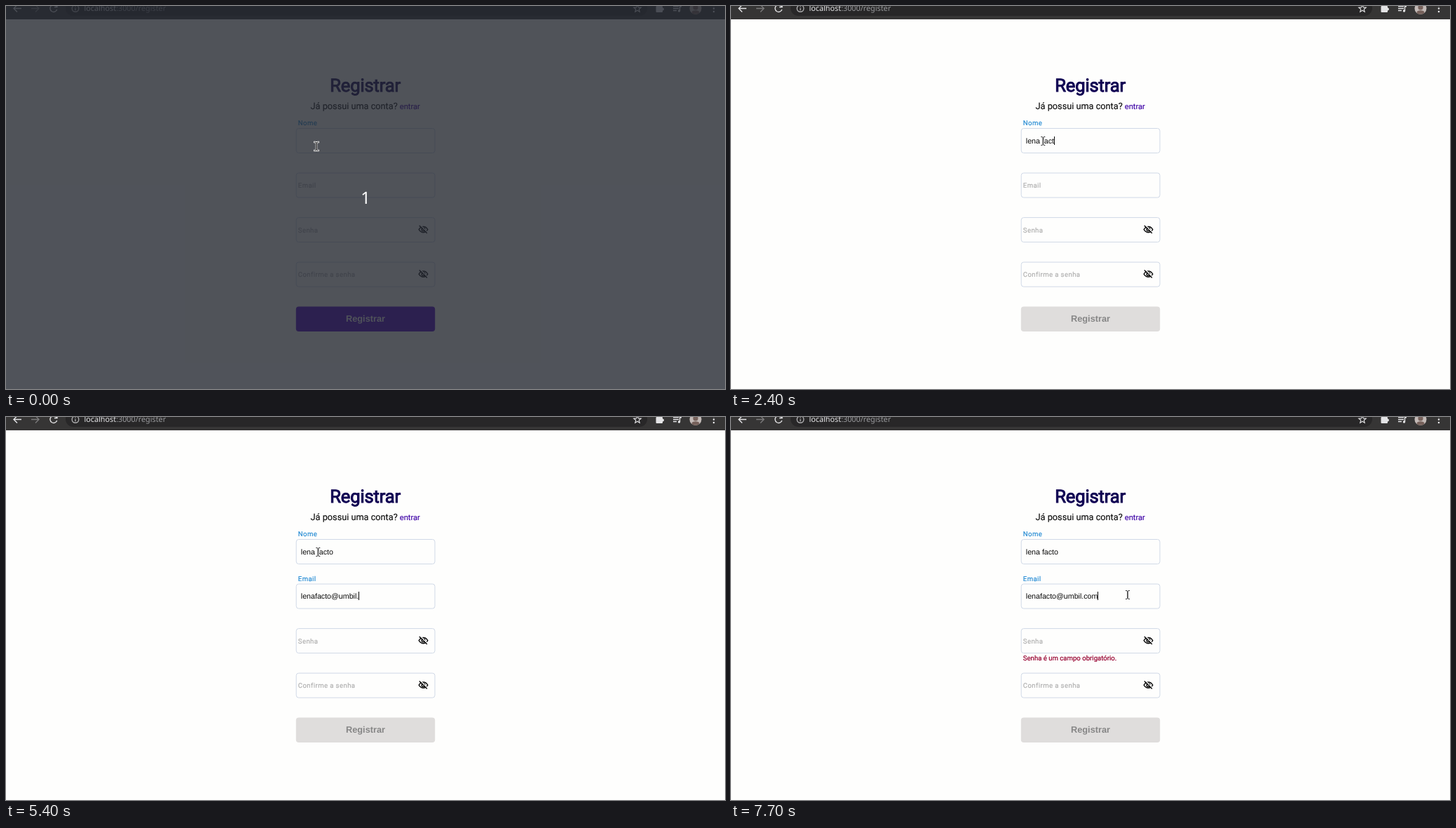
Animation of 1026 by 546 pixels, one loop 8 s. Source, as an HTML page:

```html
<!DOCTYPE html>
<html lang="pt">
<head>
<meta charset="utf-8">
<title>Registrar</title>
<style>
html, body { margin: 0; width: 100%; height: 100%; overflow: hidden; background: #fefefd; }
svg { display: block; }
text { font-family: Roboto, sans-serif; text-rendering: geometricPrecision; white-space: pre; }
.url { font: 10.8px "Noto Sans", sans-serif; fill: #9a9b9e; }
.url tspan { fill: #e6e6e8; }
.title { font-size: 25.6px; letter-spacing: -.15px; fill: #0f0052; stroke: #0f0052; stroke-width: 1px; }
.sub { font-size: 12.8px; letter-spacing: -.04px; fill: #0a0a0a; stroke: #0a0a0a; stroke-width: .12px; }
.sub tspan { font-size: 11.2px; fill: #3d00a6; stroke: #3d00a6; }
.box { fill: #fefefd; stroke: #d0d9e7; }
.label { font-size: 9.6px; letter-spacing: .4px; stroke-width: .15px; }
.value { font: 10.667px "Liberation Sans", Arial, sans-serif; fill: #080808; }
.error { font-size: 9.6px; fill: #970030; stroke: #970030; stroke-width: .22px; }
.submit { font: bold 12.8px "Liberation Sans", Arial, sans-serif; text-anchor: middle; }
.count { font: 24px "Noto Sans", sans-serif; fill: #fff; text-anchor: middle; }
.line { fill: none; stroke: #e4e4e6; stroke-width: 1.4; }
.solid { fill: #e4e4e6; }
</style>
</head>
<body>
<svg width="1026" height="546" viewBox="0 0 1026 546">
  <defs>
    <g id="eye" fill="none" stroke="#080808" stroke-width="2.2">
      <path d="M-10 0Q-6 -6.5 0 -6.5T10 0Q6 6.5 0 6.5T-10 0Z"/>
      <circle r="3.7"/>
      <path d="M-7 -10L10.500 7.500" stroke="#fefefd"/>
      <path d="M-9 -9L8.500 8.500"/>
    </g>
    <path id="arrow" class="line" d="M6 0H-5M0 -5L-5 0L0 5"/>
    <path id="beam" d="M-2.5 -6Q0 -6 0 -5V5Q0 6 -2.5 6M2.5 -6Q0 -6 0 -5V5Q0 6 2.5 6"/>
  </defs>

  <rect width="1026" height="546" fill="#fefefd"/>

  <rect width="1026" height="19" fill="#363535"/>
  <rect x="85" y="-8" width="830" height="22" rx="11" fill="#282728"/>
  <use href="#arrow" x="16" y="3.5"/>
  <use href="#arrow" transform="translate(42 3.500) scale(-1 1)" opacity=".4"/>
  <path class="line" d="M72 .5A5 5 0 1 0 72.700 5M73 -2V1.500H69"/>
  <g class="line" opacity=".7">
    <circle cx="99" cy="3.5" r="4.800"/>
    <path d="M99 3V6.300M99 .6V1.800"/>
  </g>
  <text class="url" x="111.5" y="7"><tspan>localhost</tspan>:3000/register</text>
  <polygon id="star" class="line" style="stroke-width:1.1"/>
  <g class="solid">
    <rect x="927.5" width="9.500" height="9" rx="1"/>
    <circle cx="932.3" r="2"/>
    <circle cx="937" cy="4.600" r="2"/>
  </g>
  <path class="line" d="M952 .5H960M952 3.500H960M952 6.500H957M961.500 7V.7H964"/>
  <circle class="solid" cx="960.5" cy="7" r="1.7"/>
  <circle cx="984" cy="3.5" r="8.5" fill="#c3bab7"/>
  <circle cx="984" cy="2" r="3.6" fill="#76615b"/>
  <ellipse cx="984" cy="9" rx="5.5" ry="2.800" fill="#76615b"/>
  <path class="line" style="stroke-width:2.6" stroke-linecap="round" stroke-dasharray="0 4.500" d="M1010 -5.500V9"/>

  <text class="title" x="462.2" y="122.3">Registrar</text>
  <text class="sub" x="434.6" y="147">Já possui uma conta? <tspan>entrar</tspan></text>
  <g id="fields"></g>
  <text id="error" class="error" x="416.8" y="347.2">Senha é um campo obrigatório.</text>
  <rect id="button" x="413.8" y="428.5" width="198.4" height="35.4" rx="4"/>
  <text id="submit" class="submit" x="513" y="450">Registrar</text>
  <rect id="caret" width="1" height="12" fill="#080808"/>

  <g id="countdown">
    <rect width="1026" height="546" fill="rgb(37,40,49)" fill-opacity=".8"/>
    <text class="count" x="513" y="282">1</text>
  </g>
  <g id="cursor" fill="none" stroke-linecap="square">
    <use href="#beam" stroke="#fff" stroke-width="2.6"/>
    <use href="#beam" stroke="#2a2a2a"/>
  </g>
</svg>

<script>
const LOOP = 8000, TICK = 100, BLINK = 600, TEXT_X = 420.8;
const TO_NAME = 400, TO_EMAIL = 2700, TO_PASSWORD = 5800, BACK = 7100, FIX = 7500;
const $ = id => document.getElementById(id);
const show = (el, on) => el.setAttribute("visibility", on ? "visible" : "hidden");
const mix = (a, b, p) => `color-mix(in srgb, ${b} ${p * 100}%, ${a})`;
const progress = (t, start, end) => Math.min(1, Math.max(0, (t - start) / (end - start)));
const smooth = p => p * p * (3 - 2 * p);
const fade = (t, start) => smooth(progress(t, start - TICK, start + 200));

// Text typed from its first letter at start to its last at end
function typed(text, t, start, end, curve = 1) {
  if (t < start) return "";
  const p = progress(t, start, end) ** curve;
  return text.slice(0, 1 + Math.round((text.length - 1) * p));
}

const nameAt = t => typed("lena facto", t, 1200, 2600, .7);
const emailAt = t =>
  typed("lenafacto", t, 3000, 4200) +
  typed("@umbil.", t, 4600, 5400) +
  (t < FIX ? typed("cpm", t, 5500, 5700) : typed("com", t, FIX, 7700));

function focusAt(t) {
  if (t < TO_NAME) return -1;
  if (t < TO_EMAIL) return 0;
  return t < TO_PASSWORD || t >= BACK ? 1 : 2;
}

// The caret stays lit for a while after each key or change of focus
const inputAt = t => [focusAt(t), nameAt(t), emailAt(t)].join();
const caretLit = t => inputAt(t) !== inputAt(t - BLINK);

// Curved move: eased along a line, pushed sideways in the middle
function arc(p, from, to, bend) {
  return from.map((a, i) => a + (to[i] - a) * smooth(p) + bend[i] * Math.sin(Math.PI * p));
}
const REST = [445.3, 192.5];
const cursorAt = t => t < 6500
  ? arc(progress(t, 0, 400), [443, 200], REST, [-2, 9])
  : arc(progress(t, 6500, BACK), REST, [566, 253.5], [35, 28]);

$("star").setAttribute("points", Array.from({ length: 10 }, (_, i) => {
  const r = i % 2 ? 2.4 : 5.5, a = i * Math.PI / 5;
  return [901 + r * Math.sin(a), 3.8 - r * Math.cos(a)];
}).join(" "));

const fields = ["Nome", "Email", "Senha", "Confirme a senha"].map((name, i) => {
  const top = 174.5 + 63.55 * i;
  const g = document.createElementNS("http://www.w3.org/2000/svg", "g");
  g.innerHTML = `<rect class="box" x="414.2" y="${top}" width="197.8" height="35" rx="3.5"/>
    <text class="label" x="416.8">${name}</text>
    <text class="value" x="${TEXT_X}" y="${top + 21.2}"></text>` +
    (i > 1 ? `<use href="#eye" transform="translate(595.5 ${top + 17}) scale(.63)"/>` : "");
  $("fields").append(g);
  return { top, label: g.querySelector(".label"), value: g.querySelector(".value") };
});

function setLabel({ label, top }, raised) {
  label.setAttribute("y", top + 21 - 25.4 * raised);
  label.style.fill = label.style.stroke = mix("#acacac", "#1b86d2", raised);
}

function drawCaret(t) {
  const lit = caretLit(t);
  show($("caret"), lit);
  if (!lit) return;
  const { value, top } = fields[focusAt(t)];
  const width = value.textContent ? value.getComputedTextLength() : 0;
  $("caret").setAttribute("x", Math.floor(TEXT_X + width + .3));
  $("caret").setAttribute("y", Math.round(top + 11.2));
}

function draw(t) {
  show($("countdown"), t < TICK);
  fields[0].value.textContent = nameAt(t);
  fields[1].value.textContent = emailAt(t);

  const raised = [1, fade(t, TO_EMAIL), fade(t, TO_PASSWORD) - fade(t, BACK), 0];
  fields.forEach((f, i) => setLabel(f, raised[i]));
  show($("error"), t > BACK);

  const off = fade(t, 1200);
  $("button").style.fill = mix("#4c00cb", "#dfdddc", off);
  $("submit").style.fill = mix("#fefefe", "#868686", off);

  drawCaret(t);
  $("cursor").setAttribute("transform", `translate(${cursorAt(t)})`);
}

const start = performance.now();
function frame() {
  const t = (performance.now() - start) % LOOP;
  draw(Math.floor(t / TICK) * TICK);
  requestAnimationFrame(frame);
}
frame();
</script>
</body>
</html>
```
